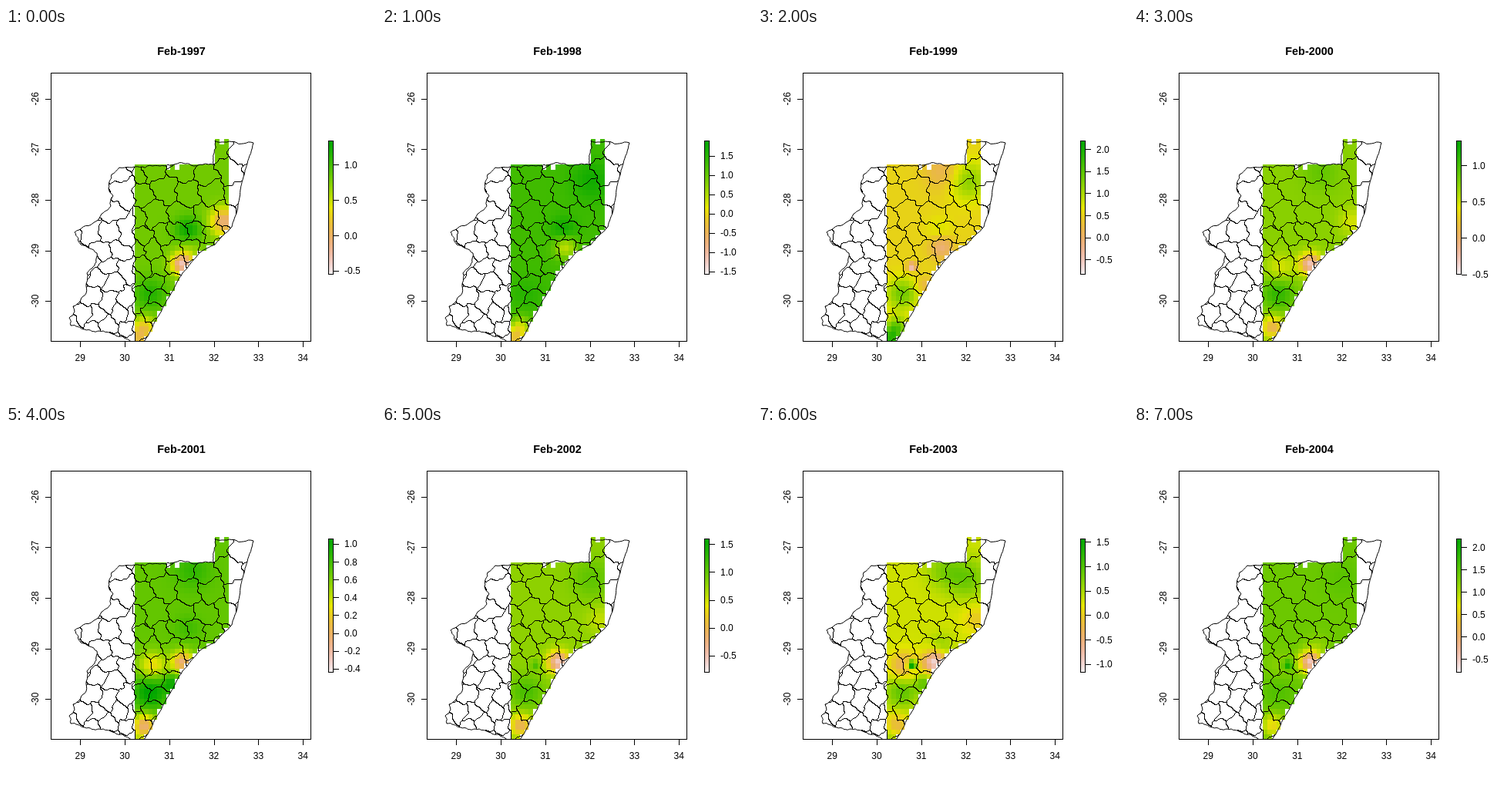
Animation of 480 by 480 pixels, one loop 8000 ms. Source, as an HTML page with a canvas:

```html
<!DOCTYPE html>
<html lang="en">
<head>
<meta charset="utf-8">
<title>February map</title>
<style>
html, body { margin: 0; width: 100%; height: 100%; overflow: hidden; background: #fff; }
canvas { display: block; width: 480px; height: 480px; }
</style>
</head>
<body>
<canvas id="map" width="480" height="480"></canvas>
<script>
const ctx = document.getElementById("map").getContext("2d");
const FONT = '"Liberation Sans", Arial, sans-serif';
const STEP = 1000, FIRST_YEAR = 1997;
const CELL = { x: 167.2, y: 144.4, w: 5.78, h: 6.56 };

// Places where the field rises or dips: x, y, radius.
const spots = {
  north: [242, 187, 24], northeast: [272, 198, 26], centre: [236, 262, 17],
  bay: [283, 251, 18], hill: [238, 284, 15], mouth: [229, 306, 14],
  pocket: [200, 310, 6], vale: [190, 311, 18], midlands: [187, 345, 21],
  cove: [215, 334, 11], south: [180, 388, 14], corner: [171, 404, 14]
};

// Legend range, tick step, base level and the height at each spot.
const years = [
  { lo: -.55, hi: 1.34, tick: .5, base: .72, centre: .25, bay: -.47, hill: -.08, mouth: -.6, midlands: .18, south: -.3, corner: -.3 },
  { lo: -1.58, hi: 1.9, tick: .5, base: .83, northeast: .12, centre: .14, hill: -.28, midlands: .06, south: -.28, corner: -.4 },
  { lo: -.84, hi: 2.2, tick: .5, base: .45, north: -.15, northeast: .23, centre: .08, hill: -.21, pocket: -.35, midlands: .27, cove: -.12, south: .28, corner: .4 },
  { lo: -.5, hi: 1.34, tick: .5, base: .67, north: .08, bay: -.14, mouth: -.55, vale: -.15, midlands: .2, south: -.35 },
  { lo: -.44, hi: 1.06, tick: .2, base: .75, north: .12, centre: .08, mouth: -.5, vale: -.3, midlands: .27, cove: .2, south: -.48, corner: -.1 },
  { lo: -.8, hi: 1.6, tick: .5, base: .66, northeast: .1, bay: -.1, mouth: -.56, pocket: .15, midlands: .15, south: -.35 },
  { lo: -1.17, hi: 1.57, tick: .5, base: .54, north: .14, northeast: .18, bay: -.12, hill: .1, mouth: -.48, pocket: .7, vale: -.26, midlands: .22, cove: .2, south: -.2, corner: .1 },
  { lo: -.8, hi: 2.19, tick: .5, base: .73, northeast: .04, hill: -.06, mouth: -.62, pocket: .28, vale: -.06, midlands: .06, south: -.28 }
];

const coast = "321,149 313,176 304,210 300,237 293,258 271,281 252,291 229,318 212,348 171,421";
const border = "171,421 160,405 121,393 102,391 84,386 82,376 89,368 87,361 104,344 105,318 117,304 118,292 97,281 89,265 113,253 123,243 136,231 139,218 133,208 137,190 147,181 200,179 240,178 270,178 271,146 321,149";
const gaps = ["19,0", "7,5", "9,5"];

function seeded(seed) {
  return () => (seed = seed * 16807 % 2147483647) / 2147483647;
}

// Midpoint displacement turns a few key points into a ragged line.
function trace(path, line, roughness) {
  const random = seeded(41);
  const split = (ax, ay, bx, by) => {
    const len = Math.hypot(bx - ax, by - ay);
    if (len < 4) return path.lineTo(bx, by);
    const d = (random() - .5) * 2 * Math.min(len * .15, 2) * roughness / len;
    const x = (ax + bx) / 2 - (by - ay) * d, y = (ay + by) / 2 + (bx - ax) * d;
    split(ax, ay, x, y);
    split(x, y, bx, by);
  };
  const pts = line.split(" ").map(p => p.split(",").map(Number));
  path.lineTo(...pts[0]);
  for (let i = 1; i < pts.length; i++) split(...pts[i - 1], ...pts[i]);
}

const land = new Path2D();
trace(land, coast, .3);
trace(land, border, 1);

// District seats on a staggered, jittered grid, closer together in the south.
function placeSeats() {
  const random = seeded(1997), seats = [];
  for (let y = 160, row = 0, gap; y < 420; y += gap * .87, row++) {
    gap = y < 265 ? 31 : 23;
    for (let x = 85 + row % 2 * gap / 2; x < 325; x += gap) {
      seats.push([x + (random() - .5) * gap * .5, y + (random() - .5) * gap * .5]);
    }
  }
  return seats;
}

// Each pixel belongs to its nearest seat; waves make the limits ragged.
function drawDistricts() {
  const DIVIDE = 165, seats = placeSeats();
  const district = (px, py) => {
    const x = px + 2.2 * Math.sin(py / 4 + Math.sin(px / 7)) + .9 * Math.sin(py / 1.7 + px / 3);
    const y = py + 2.2 * Math.sin(px / 4.3 + Math.sin(py / 6)) + .9 * Math.sin(px / 1.9 - py / 3);
    let best = -1, least = Infinity;
    seats.forEach(([sx, sy], i) => {
      const d = (x - sx) ** 2 + (y - sy) ** 2;
      if (d < least && (sx < DIVIDE) === (x < DIVIDE)) [best, least] = [i, d];
    });
    return best;
  };
  const layer = document.createElement("canvas");
  layer.width = layer.height = 480;
  const pen = layer.getContext("2d");
  pen.clip(land);
  let above = [];
  for (let y = 140; y < 408; y++) {
    const line = [];
    for (let x = 80; x < 324; x++) {
      line[x] = district(x, y);
      const edge = x > 80 && line[x] !== line[x - 1] || y > 140 && line[x] !== above[x];
      if (edge) pen.fillRect(x, y, 1, 1);
    }
    above = line;
  }
  return layer;
}

const districts = drawDistricts();

// Green at the top, through yellow, to near white at the bottom.
function terrain(t) {
  t = Math.max(0, Math.min(1, t));
  const u = t > .5 ? (1 - t) * 2 : (.5 - t) * 2;
  const [h, s, v] = t > .5 ? [120 - 60 * u, 1, .65 + .25 * u] : [60 - 60 * u, 1 - u, .9 + .05 * u];
  const channel = n => {
    const k = (n + h / 60) % 6;
    return Math.round(255 * v * (1 - s * Math.max(0, Math.min(k, 4 - k, 1))));
  };
  return `rgb(${channel(5)},${channel(3)},${channel(1)})`;
}

function level(year, x, y) {
  return Object.entries(spots).reduce((sum, [name, [sx, sy, r]]) =>
    sum + (year[name] || 0) * Math.exp(-((x - sx) ** 2 + (y - sy) ** 2) / (r * r)), year.base);
}

function segment(x1, y1, x2, y2) {
  ctx.beginPath();
  ctx.moveTo(x1, y1);
  ctx.lineTo(x2, y2);
  ctx.stroke();
}

function label(text, x, y, align = "center", font = "12px ") {
  ctx.font = font + FONT;
  ctx.textAlign = align;
  ctx.fillStyle = "#000";
  ctx.fillText(text, x, y);
}

const snap = v => Math.round(v) + .5;

function drawCells(year) {
  for (let row = 0; row < 40; row++) {
    const top = Math.round(CELL.y + row * CELL.h), bottom = Math.round(CELL.y + (row + 1) * CELL.h);
    for (let col = row < 5 ? 18 : 0; col < 21; col++) {
      const left = Math.round(CELL.x + col * CELL.w), right = Math.round(CELL.x + (col + 1) * CELL.w);
      const x = (left + right) / 2, y = (top + bottom) / 2;
      if (gaps.includes(col + "," + row) || !ctx.isPointInPath(land, x, y + 2)) continue;
      ctx.fillStyle = terrain(level(year, x, y));
      ctx.fillRect(left, top, right - left, bottom - top);
    }
  }
}

function drawAxes() {
  ctx.strokeRect(58.5, 58.5, 337, 348);
  for (let lon = 29; lon <= 34; lon++) {
    const x = 96.2 + (lon - 29) * 57.8;
    segment(snap(x), 407, snap(x), 414);
    label(lon, x, 432);
  }
  for (let lat = 26; lat <= 30; lat++) {
    const y = 91.8 + (lat - 26) * 65.6;
    segment(51, snap(y), 58, snap(y));
    ctx.save();
    ctx.translate(41.5, y);
    ctx.rotate(-Math.PI / 2);
    label("-" + lat, 0, 0);
    ctx.restore();
  }
}

function drawLegend({ lo, hi, tick }) {
  const top = 146, height = 173.5;
  for (let y = 0; y < height; y++) {
    ctx.fillStyle = terrain(1 - y / height);
    ctx.fillRect(418, top + y, 7, 1);
  }
  ctx.strokeRect(418.5, 146.5, 6, 173);
  for (let n = Math.ceil(lo / tick); n * tick <= hi; n++) {
    const y = top + (hi - n * tick) / (hi - lo) * height;
    segment(425, snap(y), 432, snap(y));
    label((n * tick).toFixed(1), 439, y + 4.5, "left");
  }
}

function draw(index) {
  const year = years[index];
  ctx.fillStyle = "#fff";
  ctx.fillRect(0, 0, 480, 480);
  ctx.strokeStyle = "#000";
  ctx.save();
  ctx.beginPath();
  ctx.rect(58, 58, 338, 349);
  ctx.clip();
  drawCells(year);
  ctx.drawImage(districts, 0, 0);
  ctx.stroke(land);
  ctx.restore();
  drawAxes();
  drawLegend(year);
  label("Feb-" + (FIRST_YEAR + index), 227.5, 35, "center", "bold 14.4px ");
}

const start = performance.now();
let shown = -1;
function tick(now) {
  const index = Math.floor(Math.max(0, now - start) / STEP) % years.length;
  if (index !== shown) draw(shown = index);
  requestAnimationFrame(tick);
}
tick(start);
</script>
</body>
</html>
```
